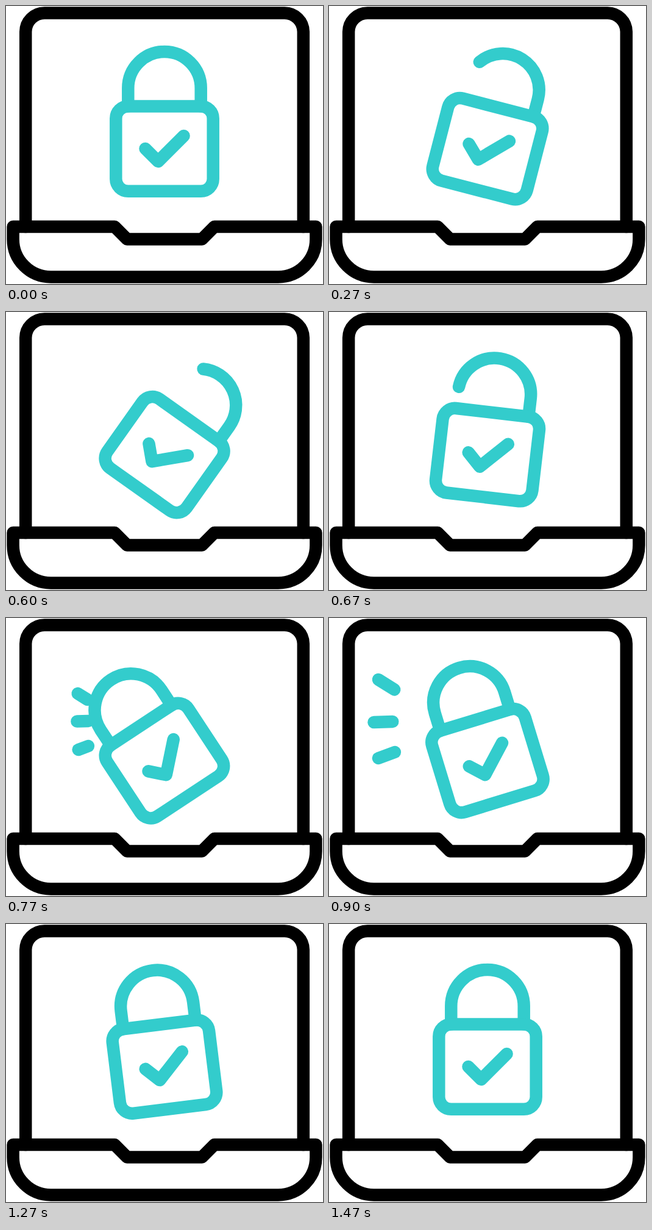
Recreate the animation shown at these times as an HTML page. Size 520x456 px, loop 1.67 s.

```html
<!DOCTYPE html>
<html lang="en">
<head>
<meta charset="utf-8">
<title>Secure laptop</title>
<style>
  html, body { margin: 0; width: 100%; height: 100%; overflow: hidden; background: #fff; }
  svg { display: block; width: 100vw; height: 100vh; }
  path, rect, line { fill: none; stroke-width: 20.5; stroke-linecap: round; stroke-linejoin: round; }
</style>
</head>
<body>
<svg viewBox="0 0 520 456">
  <g stroke="#000">
    <path d="M32.2 362V42.3A31 31 0 0 1 63.2 11.5H456.8A31 31 0 0 1 487.8 42.3V362"/>
    <path d="M11.6 362H178.2L198.6 382.4H321.4L341.8 362H508.4V382.4A62 62 0 0 1 446.4 444.4H73.6A62 62 0 0 1 11.6 382.4Z"/>
  </g>
  <g stroke="#33cccc">
    <g id="sparks"></g>
    <g id="lock">
      <path id="shackle"/>
      <rect x="180.3" y="164.4" width="159.4" height="139.4" rx="20"/>
      <path d="M228.5 234L249.6 255L291.6 213"/>
    </g>
  </g>
</svg>
<script>
const LOOP = 1670;
const PIVOT = [260, 234.2];
const ARC = { x: 260, y: 134.6, r: 59.7, foot: 164.4 };

// Key poses as [tick, value]; 30 ticks per second.
const SWING = [[2, 0], [16.8, 41], [23.6, -34.8], [32, 15.7], [39, -8.2], [44, 0]];
const OPEN = [[2, 0], [12, 0.415], [17, 0.415], [22, 0]];
const HEAD = [[21, 0], [26.4, 1]];
const TAIL = [[24, 0], [30, 1]];
const RAYS = [
  [133.5, 133.8, 81, 101],
  [135, 169, 73.5, 171],
  [135, 210, 81, 230]
];

const byId = id => document.getElementById(id);
const lock = byId('lock'), shackle = byId('shackle');
const mix = (a, b, k) => a + (b - a) * k;
const ease = k => (1 - Math.cos(Math.PI * k)) / 2;

function valueAt(keys, n) {
  if (n <= keys[0][0]) return keys[0][1];
  for (let i = 1; i < keys.length; i++) {
    const [t0, v0] = keys[i - 1], [t1, v1] = keys[i];
    if (n < t1) return mix(v0, v1, ease((n - t0) / (t1 - t0)));
  }
  return keys[keys.length - 1][1];
}

// Shackle outline with a share of its length removed from the left foot.
function shacklePath(cut) {
  const { x, y, r, foot } = ARC;
  const leg = foot - y;
  const gone = cut * (2 * leg + Math.PI * r);
  const end = `A${r} ${r} 0 0 1 ${x + r} ${y}V${foot}`;
  if (gone < leg) return `M${x - r} ${foot - gone}V${y}${end}`;
  const a = (gone - leg) / r;
  return `M${x - r * Math.cos(a)} ${y - r * Math.sin(a)}${end}`;
}

const rays = RAYS.map(() => {
  const line = document.createElementNS('http://www.w3.org/2000/svg', 'line');
  byId('sparks').appendChild(line);
  return line;
});

function drawRays(n) {
  const head = valueAt(HEAD, n), tail = valueAt(TAIL, n);
  rays.forEach((line, i) => {
    const [x1, y1, x2, y2] = RAYS[i];
    line.setAttribute('visibility', head > tail ? 'visible' : 'hidden');
    line.setAttribute('x1', mix(x1, x2, tail));
    line.setAttribute('y1', mix(y1, y2, tail));
    line.setAttribute('x2', mix(x1, x2, head));
    line.setAttribute('y2', mix(y1, y2, head));
  });
}

function draw(ms) {
  const t = ms % LOOP;
  const n = Math.floor((10 * Math.floor(t / 10) + 5) * 0.03);
  lock.setAttribute('transform', `rotate(${valueAt(SWING, n)} ${PIVOT})`);
  shackle.setAttribute('d', shacklePath(valueAt(OPEN, n)));
  drawRays(n);
}

let start = null;
function tick(now) {
  if (start === null) start = now;
  draw(now - start);
  requestAnimationFrame(tick);
}
draw(0);
requestAnimationFrame(tick);
</script>
</body>
</html>
```
